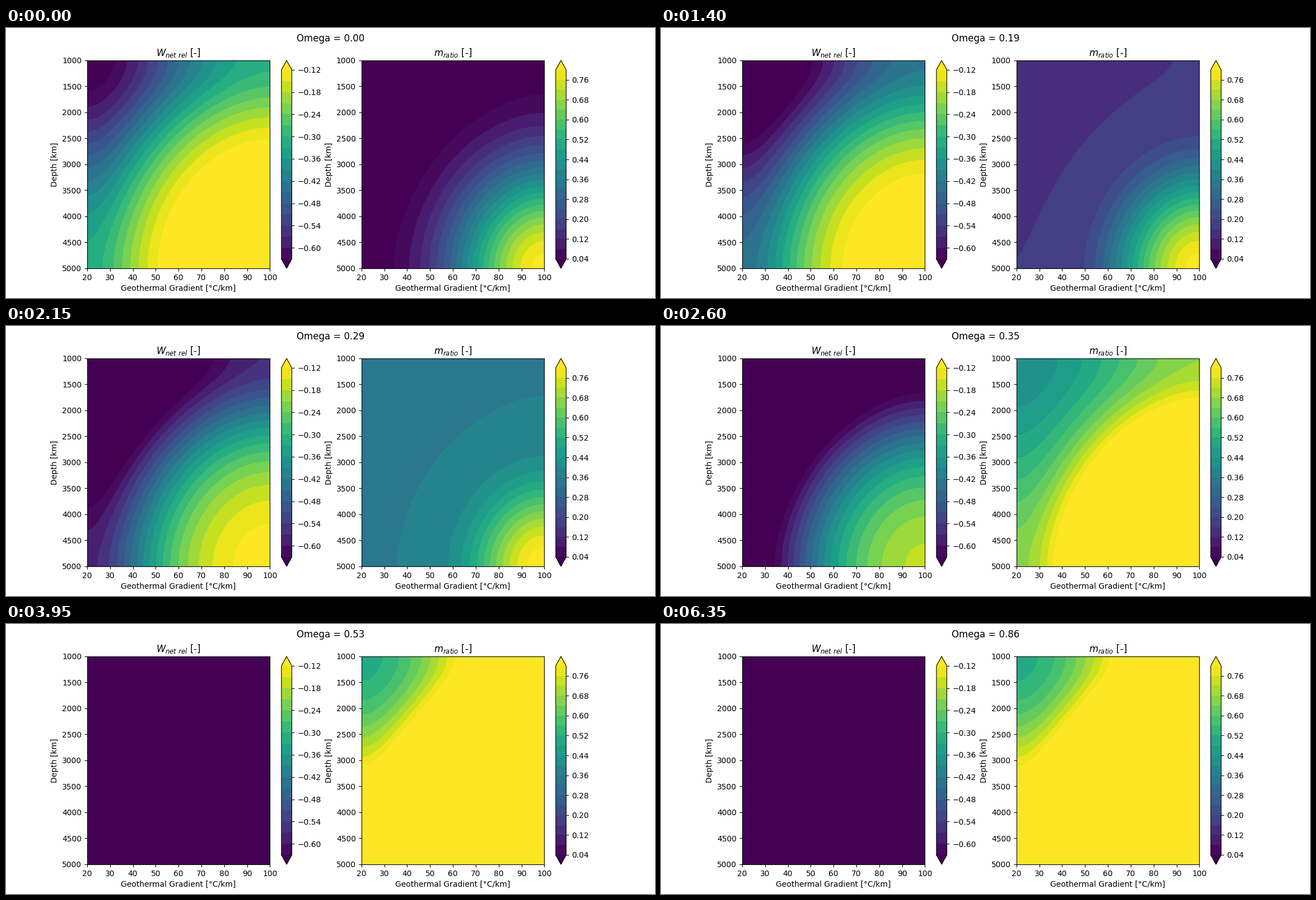
A matplotlib script that plays this animation: 1159 by 483 pixels, repeating every 6400 ms.

```python
import numpy as np
import matplotlib.pyplot as plt
from matplotlib.animation import FuncAnimation

FRAMES, STEP_MS = 128, 50
OMEGA_STEP = 1 / 148
TURN, FULL = 0.2905, 0.435  # omega where the mass ratio takes off and settles


def smooth(u):
    return u * u * (3 - 2 * u)


unit = np.linspace(0, 1, 91)
gradient = 20 + 80 * unit
depth = 1000 + 4000 * unit

# Resource quality grows with gradient, depth and their product
across, down = np.meshgrid(smooth(unit), smooth(unit))
heat = 1.05 * across + down + 3 * across * down


def net_work(omega):
    scale = 0.659 * np.exp(0.3 * omega + 2.6 * omega**2)
    decay = max(0.725 - 0.68 * omega - 1.1 * omega**2, 0)
    return -scale * np.exp(-decay * heat)


def mass_ratio(omega):
    w = min(omega, TURN)
    low = 0.75 * w + 0.125 * (w / TURN)**7 + 0.012 * heat
    limit = 0.5 + 0.5 * heat + 0.09 * heat**2
    mix = np.clip((omega - TURN) / (FULL - TURN), 0, 1)
    base = (1 - mix) * low + mix * limit
    rise = np.maximum(0.0282 * (heat + 0.52)**2 - 0.058, 0)
    return (base**4 + rise**4)**0.25


fig, axes = plt.subplots(1, 2, figsize=(11.59, 4.83), dpi=100)
fig.subplots_adjust(right=0.8999)
heading = fig.suptitle("Omega = 0.00")

panels = [
    (axes[0], r"$W_{net\ rel}$ [-]", net_work,
     np.linspace(-0.63, -0.12, 18).round(2)),
    (axes[1], r"$m_{ratio}$ [-]", mass_ratio,
     np.linspace(0.04, 0.80, 20).round(2)),
]


def fill(ax, field, levels, omega):
    return ax.contourf(gradient, depth, field(omega), levels=levels,
                       cmap="viridis", extend="both")


for ax, title, field, levels in panels:
    fig.colorbar(fill(ax, field, levels, 0), ax=ax)
    ax.set_title(title)
    ax.set_xlabel("Geothermal Gradient [°C/km]")
    ax.set_ylabel("Depth [km]")
    ax.set_xticks(range(20, 101, 10))
    ax.set_yticks(range(1000, 5001, 500))
    ax.set_xlim(20, 100)
    ax.set_ylim(5000, 1000)


def update(i):
    omega = i * OMEGA_STEP
    heading.set_text(f"Omega = {omega:.2f}")
    for ax, _, field, levels in panels:
        for old in list(ax.collections):
            old.remove()
        fill(ax, field, levels, omega)
    return []


anim = FuncAnimation(fig, update, frames=FRAMES, interval=STEP_MS,
                     repeat=True, repeat_delay=0)
plt.show()
```
